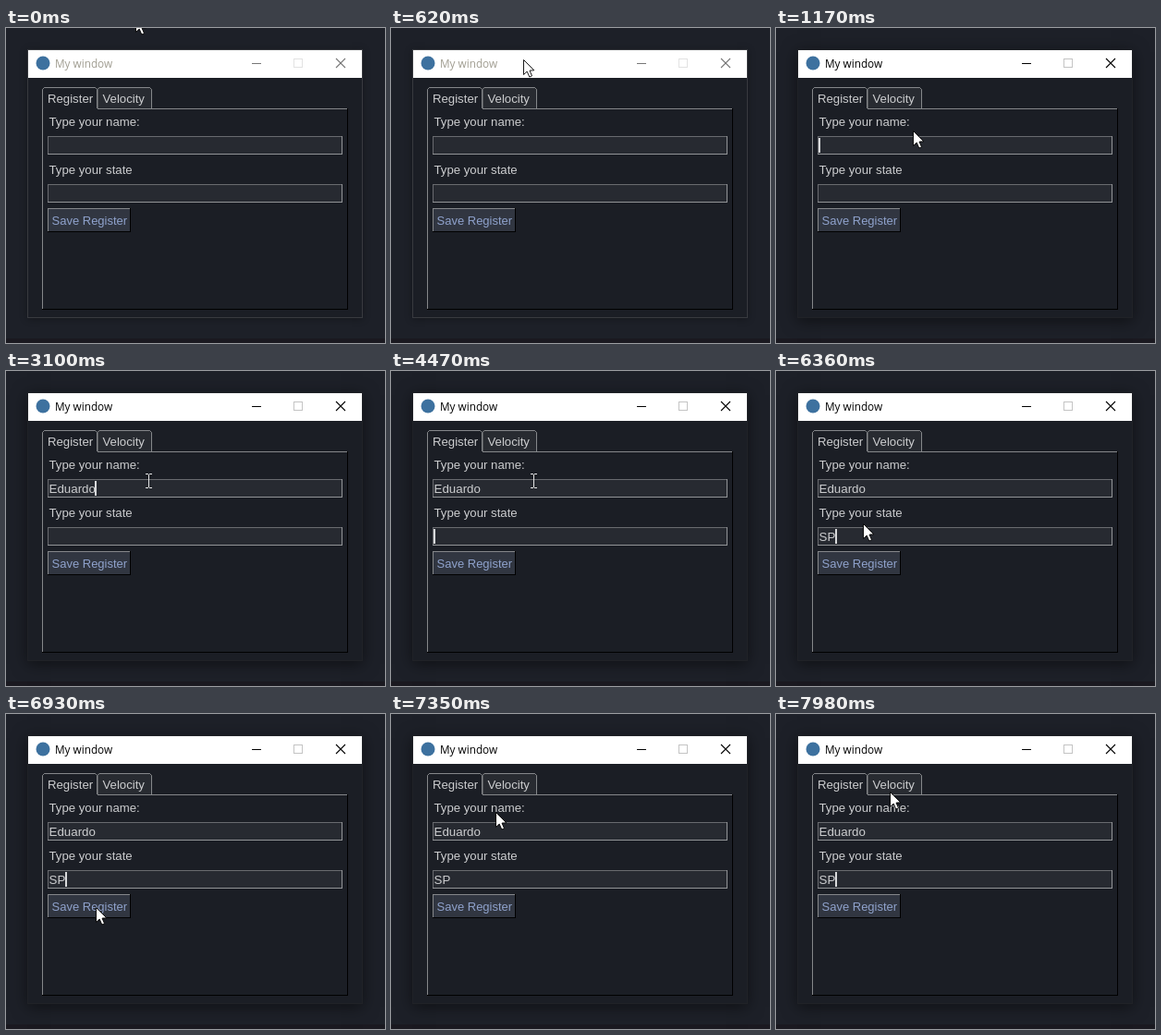
Recreate the animation shown at these times as an HTML page with a canvas. Size 410 by 341 pixels, loop 8 s.

```html
<!DOCTYPE html>
<html lang="en">
<head>
<meta charset="utf-8">
<title>My window</title>
<style>
html, body { margin: 0; width: 100%; height: 100%; overflow: hidden; background: #1d2028; }
canvas { display: block; }
</style>
</head>
<body>
<canvas id="stage" width="410" height="341"></canvas>
<script>
const ctx = document.getElementById('stage').getContext('2d');
const LOOP = 8000;
const SANS = '"Liberation Sans", Arial, sans-serif';
const BODY = '#1b1e25', TEXT = '#cccdcf', LIGHT = '#85878a', DARK = '#000';

const ACTIVATE = 860, FOCUS = 975, TAB_KEY = 3590, CLICK = 6760;
const BLINK_ON = 582, BLINK_OFF = 291;

const FIELDS = [
  { y: 117, text: 'Eduardo', start: 2430, step: 111 },
  { y: 169, text: 'SP', start: 4950, step: 50 }
];

const HOME = { x: 140, y: -12 };
const MOVES = [
  { from: 210, to: 620, x: 143, y: 34 },
  { from: 880, to: 1250, x: 148, y: 111 },
  { from: 1540, to: 1560, x: 154, y: 119 },
  { from: 5920, to: 6360, x: 94, y: 165 },
  { from: 6380, to: 6720, x: 97, y: 209 },
  { from: 7030, to: 7470, x: 113, y: 104 },
  { from: 7570, to: 7980, x: 123, y: 84 }
];

// Quick start, long settling tail
function ease(u) {
  const v = 1 - (1 - u) ** 2;
  return v * v * (3 - 2 * v);
}

function pointerAt(t) {
  let { x, y } = HOME;
  for (const m of MOVES) {
    const k = ease(Math.min(1, Math.max(0, (t - m.from) / (m.to - m.from))));
    x += (m.x - x) * k;
    y += (m.y - y) * k;
  }
  return [Math.round(x), Math.round(y)];
}

// Focus changes and clicks restart the blink
function caretOn(t) {
  const since = [CLICK, TAB_KEY, FOCUS].find(start => t >= start);
  return since !== undefined && (t - since) % (BLINK_ON + BLINK_OFF) < BLINK_ON;
}

function rect(x, y, w, h, color) {
  ctx.fillStyle = color;
  ctx.fillRect(x, y, w, h);
}

function label(str, x, y, color = TEXT, size = 13.2, family = SANS) {
  ctx.font = `${size}px ${family}`;
  ctx.fillStyle = color;
  ctx.fillText(str, x, y);
}

function line(points, color, width = 1) {
  ctx.beginPath();
  points.forEach(([x, y]) => ctx.lineTo(x, y));
  ctx.strokeStyle = color;
  ctx.lineWidth = width;
  ctx.stroke();
}

function bevel(x, y, w, h, fill, topLeft, bottomRight) {
  rect(x, y, w, h, bottomRight);
  rect(x, y, w - 1, h - 1, topLeft);
  rect(x + 1, y + 1, w - 2, h - 2, fill);
}

function drawFrame(active) {
  rect(0, 0, 410, 341, '#1d2028');
  rect(0, 336, 410, 5, '#1a1920');
  ctx.save();
  ctx.shadowColor = `rgba(0,0,0,${active ? 0.5 : 0.3})`;
  ctx.shadowBlur = active ? 16 : 8;
  ctx.shadowOffsetY = active ? 3 : 1;
  rect(23, 23, 363, 291, active ? '#202227' : '#383a3f');
  ctx.restore();
  rect(24, 54, 361, 259, BODY);
  rect(24, 24, 361, 30, '#fff');

  ctx.fillStyle = '#3d719f';
  ctx.beginPath();
  ctx.arc(40, 38, 7.5, 0, Math.PI * 2);
  ctx.fill();

  const ink = active ? '#000' : '#777';
  label('My window', 53, 43, active ? '#000' : '#a09d91', 11.75, '"Open Sans", "Noto Sans", sans-serif');
  rect(266, 38, 10, 1, ink);
  ctx.strokeStyle = active ? '#c4c4c4' : '#e2e2e2';
  ctx.lineWidth = 1;
  ctx.strokeRect(311.5, 33.5, 9, 9);
  line([[357, 33], [367, 43]], ink, 1.1);
  line([[367, 33], [357, 43]], ink, 1.1);
}

function drawTab(name, x, right, fill) {
  const top = 64.5, l = x + 0.5, r = right - 0.5;
  const outline = [[l, 88], [l, top + 2], [l + 2, top], [r - 2, top], [r, top + 2], [r, 87]];
  ctx.fillStyle = fill;
  line(outline, LIGHT);
  ctx.fill();
  line(outline, LIGHT);
  label(name, x + 6, 81);
}

function drawPanel() {
  bevel(39, 87, 331, 218, BODY, LIGHT, DARK);
  drawTab('Velocity', 98.5, 158, '#282b31');
  rect(99, 87, 60, 1, LIGHT);
  drawTab('Register', 39, 99, BODY);
  rect(40, 87, 59, 1, BODY);
  label('Type your name:', 46.5, 106);
  label('Type your state', 46.5, 158);
  bevel(45, 195, 90, 26, '#313641', LIGHT, DARK);
  label('Save Register', 49.5, 213, '#8fa2cc', 13);
}

function drawField(field, t, focused) {
  const { y, text, start, step } = field;
  bevel(45, y, 319, 20, '#272a31', '#696b6f', '#929497');
  const typed = text.slice(0, Math.max(0, Math.floor((t - start) / step) + 1));
  label(typed, 46.5, y + 15, TEXT, 13.33);
  if (focused && caretOn(t)) {
    rect(46 + Math.round(ctx.measureText(typed).width), y + 2, 2, 16, '#d8d9db');
  }
}

function drawArrow(x, y) {
  ctx.save();
  ctx.translate(x + 0.5, y + 0.5);
  ctx.beginPath();
  [[0, 0], [0, 16], [3.7, 12.6], [6.3, 18.5], [9, 17.3], [6.5, 11.6], [11.3, 11.3]]
    .forEach(p => ctx.lineTo(...p));
  ctx.closePath();
  ctx.fillStyle = '#fff';
  ctx.fill();
  ctx.strokeStyle = '#000';
  ctx.lineWidth = 0.9;
  ctx.stroke();
  ctx.restore();
}

function drawBeam(x, y) {
  const c = '#e4e5e6';
  rect(x, y - 7, 1, 14, c);
  for (const end of [y - 8, y + 7]) {
    rect(x - 3, end, 3, 1, c);
    rect(x + 1, end, 3, 1, c);
  }
}

function render(t) {
  drawFrame(t >= ACTIVATE);
  drawPanel();
  const current = FIELDS[t >= TAB_KEY ? 1 : 0];
  FIELDS.forEach(f => drawField(f, t, f === current));
  const [x, y] = pointerAt(t);
  const overField = FIELDS.some(f => y >= f.y && y < f.y + 20);
  (overField ? drawBeam : drawArrow)(x, y);
}

function tick() {
  render(performance.now() % LOOP);
  requestAnimationFrame(tick);
}
tick();
</script>
</body>
</html>
```
